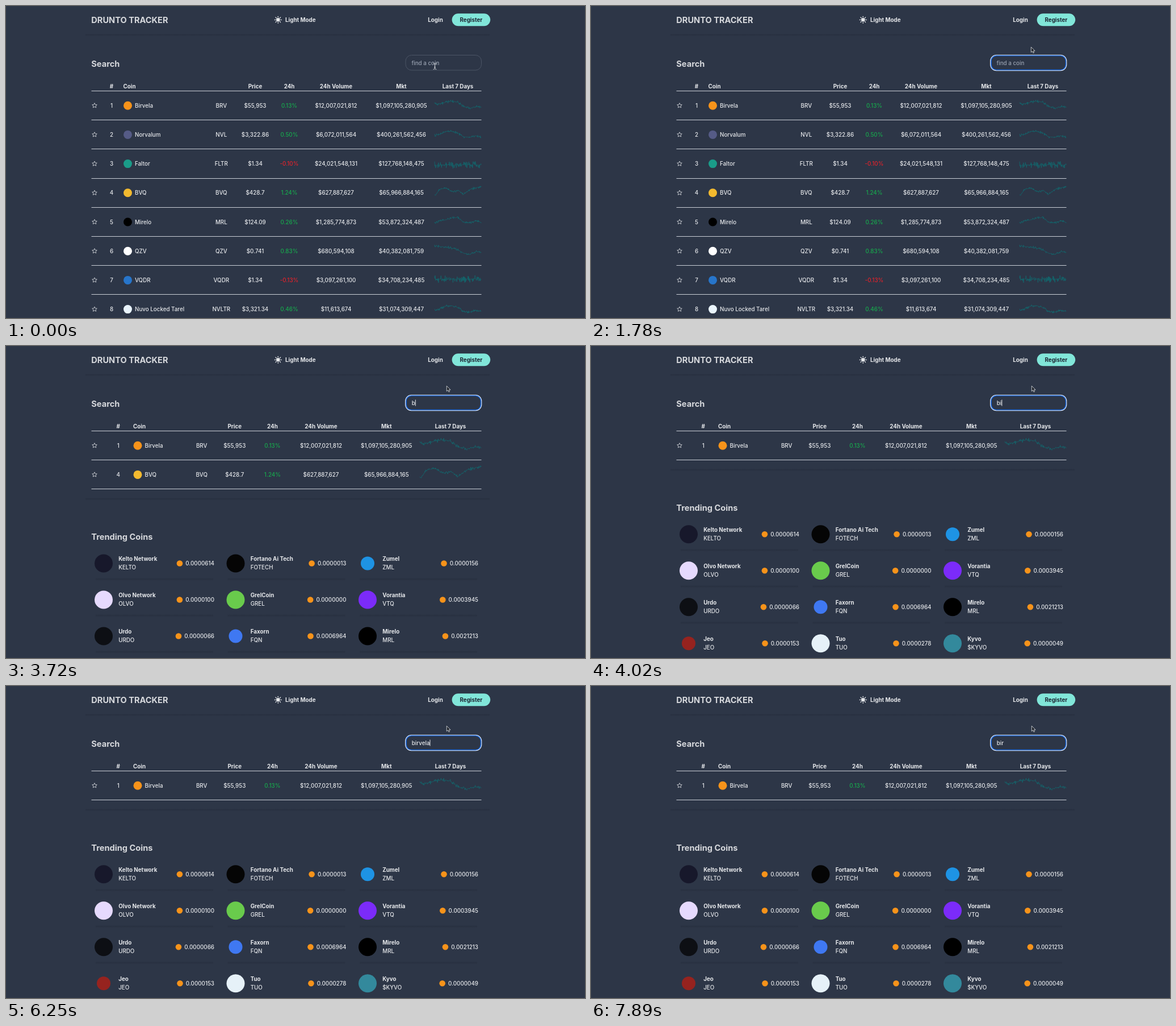
Animation of 1020x549 px, one loop 8 s. Source, as an HTML page:

```html
<!DOCTYPE html>
<html lang="en">
<head>
<meta charset="utf-8">
<title>Coin tracker</title>
<style>
html, body { margin: 0; width: 100%; height: 100%; overflow: hidden; background: #2d3647; }
svg { display: block; width: 1020px; height: 549px; font: 500 9.8px Inter, "Open Sans", sans-serif; fill: #e6e8eb; }
.b { font-weight: 700; }
.h { font-weight: 700; font-size: 14.6px; fill: #d6d8dc; }
.m { text-anchor: middle; }
.e { text-anchor: end; }
.up { fill: #17a94d; }
.down { fill: #e3222b; }
.line { stroke: #c9ced6; }
.spark { stroke: #14666c; fill: none; stroke-linejoin: round; }
.star { stroke: #e0e3e6; fill: none; stroke-width: .8; stroke-linejoin: round; }
</style>
</head>
<body>
<svg viewBox="0 0 1020 549">
  <defs>
    <linearGradient id="fade" x2="0" y2="1">
      <stop stop-color="#1c2230" stop-opacity="0"/>
      <stop offset=".4" stop-color="#1c2230" stop-opacity=".28"/>
      <stop offset="1" stop-color="#1c2230" stop-opacity="0"/>
    </linearGradient>
  </defs>
  <g id="page"></g>
  <rect id="box" x="704" y="86.5" width="133.5" height="26.5" rx="10.5" fill="none" stroke="#4b5465"/>
  <g id="ring" fill="none">
    <rect x="704.9" y="87.4" width="131.7" height="25.2" rx="9.5" stroke="#1763d8" stroke-width="1.8"/>
    <rect x="703.6" y="86.2" width="134.2" height="27.5" rx="10.7" stroke="#dfeafb" stroke-width="1.1"/>
  </g>
  <text id="hint" x="714.5" y="103.6" fill="#98a1b0">find a coin</text>
  <text id="typed" x="714.8" y="103.6"></text>
  <rect id="caret" y="94.5" width="1" height="11"/>
  <path id="arrow" d="M0 0V9.4L2.2 7.5 3.7 10.7 5.2 10 3.8 6.9H6.8Z" fill="#20242c" stroke="#e4e6e9" stroke-width=".8"/>
  <path id="beam" d="M-2.8-5.2Q0-5.2 0-3.2Q0-5.2 2.8-5.2M0-3.2V3.4M-2.8 5.4Q0 5.4 0 3.4Q0 5.4 2.8 5.4M-1.5 1.8H1.5" fill="none" stroke="#d5d8dc"/>
</svg>
<script>
const $ = id => document.getElementById(id);
const ORANGE = '#f7931a';

const text = (x, y, s, cls = '') => `<text x="${x}" y="${y + 3.6}" class="${cls}">${s}</text>`;
const title = (y, s) => `<text x="150.3" y="${y + 5.4}" class="h">${s}</text>`;
const dot = (x, y, r, fill) => `<circle cx="${x}" cy="${y}" r="${r}" fill="${fill}"/>`;
const shade = (x, y, w) => `<rect x="${x}" y="${y - 2}" width="${w}" height="5" fill="url(#fade)"/>`;
const rule = i => `<path class="line" d="M150.5 ${Math.round(149 + 51.2 * i) + .5}H837.5"/>`;

// Evenly spaced sparkline heights around the row centre
const wave = [1, -1, -6, -6, -3, 4, 5, 2, 4];
const coins = [
  ['Birvela', 'BRV', '$55,953', '0.13%', '$12,007,021,812', '$1,097,105,280,905', ORANGE, [-3, -3, -6, -8, -6, 2, 5, 2, 2]],
  ['Norvalum', 'NVL', '$3,322.86', '0.50%', '$6,072,011,564', '$400,261,562,456', '#555b86', wave],
  ['Faltor', 'FLTR', '$1.34', '-0.10%', '$24,021,548,131', '$127,768,148,475', '#1a9c89', [2, 2]],
  ['BVQ', 'BVQ', '$428.7', '1.24%', '$627,887,627', '$65,966,884,165', '#f3ba2f', [5, -7, -8, -2, -4, 2, -6, -9, -11]],
  ['Mirelo', 'MRL', '$124.09', '0.26%', '$1,285,774,873', '$53,872,324,487', '#000', [2, -2, -4, -7, -8, 1, 2, -2, 1]],
  ['QZV', 'QZV', '$0.741', '0.83%', '$680,594,108', '$40,382,081,759', '#fff', [-9, -8, -7, -5, -2, 4, 6, 1, 3]],
  ['VQDR', 'VQDR', '$1.34', '-0.13%', '$3,097,261,100', '$34,708,234,485', '#2775ca', [-2, -2]],
  ['Nuvo Locked Tarel', 'NVLTR', '$3,321.34', '0.46%', '$11,613,674', '$31,074,309,447', '#e9f4fc', wave],
];
const trends = [
  ['Kelto Network', 'KELTO', '0.0000614', '#17182b'],
  ['Fortano Ai Tech', 'FOTECH', '0.0000013', '#050505'],
  ['Zumel', 'ZML', '0.0000156', '#1e93e4', 12],
  ['Olvo Network', 'OLVO', '0.0000100', '#e6dafe'],
  ['GrelCoin', 'GREL', '0.0000000', '#69cb4c'],
  ['Vorantia', 'VTQ', '0.0003945', '#7b2bf9'],
  ['Urdo', 'URDO', '0.0000066', '#0d0f14'],
  ['Faxorn', 'FQN', '0.0006964', '#3f78f2', 12],
  ['Mirelo', 'MRL', '0.0021213', '#000'],
  ['Jeo', 'JEO', '0.0000153', '#96231f', 12],
  ['Tuo', 'TUO', '0.0000278', '#e6f1f8'],
  ['Kyvo', '$KYVO', '0.0000049', '#33899c'],
];

const pen = document.createElement('canvas').getContext('2d');
pen.font = '500 9.8px Inter, "Open Sans", sans-serif';
const width = s => pen.measureText(s).width;

// Hourly points for a week: straight runs between the heights plus seeded noise
function spark(heights, seed) {
  const last = heights.length - 1, noise = last > 1 ? 2.4 : 6.5;
  const points = [];
  for (let i = 0; i < 168; i++) {
    const u = i / 168 * last, j = Math.floor(u);
    seed = seed * 16807 % 2147483647;
    const r = seed / 2147483647 * 2 - 1;
    const y = heights[j] + (heights[j + 1] - heights[j]) * (u - j) + noise * r ** 3;
    points.push((i * 82 / 167).toFixed(2) + ' ' + y.toFixed(2));
  }
  return 'M' + points.join('L');
}

function star(x, y) {
  const points = [];
  for (let i = 0; i < 10; i++) {
    const a = i * Math.PI / 5, r = i % 2 ? 2.1 : 4.5;
    points.push((x + r * Math.sin(a)).toFixed(2) + ' ' + (y - r * Math.cos(a)).toFixed(2));
  }
  return `<path class="star" d="M${points.join('L')}Z"/>`;
}

function table([num, coin, sym, price, day, vol, mkt, left], ids) {
  const k = (837 - left) / 82;
  const heads = [[num, '#'], [price, 'Price'], [day, '24h'], [vol, '24h Volume'], [mkt, 'Mkt'], [left + 41 * k, 'Last 7 Days']];
  let s = heads.map(([x, t]) => text(x, 141, t, 'b m')).join('') + text(coin, 141, 'Coin', 'b') + rule(0);
  ids.forEach((id, i) => {
    const [name, code, cost, change, volume, market, fill, heights] = coins[id];
    const y = 175.2 + 51.2 * i;
    s += star(156, y) + dot(coin + 8, y, 7.5, fill) + text(coin + 20.5, y, name)
      + [[num, id + 1], [sym, code], [price, cost], [vol, volume], [mkt, market]].map(([x, t]) => text(x, y, t, 'm')).join('')
      + text(day, y, change, 'm ' + (change[0] === '-' ? 'down' : 'up')) + rule(i + 1)
      + `<path class="spark" transform="translate(${left} ${y}) scale(${k})" stroke-width="${.9 / k}" d="${spark(heights, 77 + id * 991)}"/>`;
  });
  return s;
}

// The trending list follows a table of the given number of rows
function trending(rows) {
  const top = 166.4 + 51.2 * rows;
  let s = shade(140, top, 712) + title(top + 66.7, 'Trending Coins');
  trends.forEach(([name, code, price, fill, r = 16], i) => {
    const x = 172 + 232.5 * (i % 3), y = top + 113.7 + 64 * Math.floor(i / 3), right = x + 195;
    s += dot(x, y, r, fill) + text(x + 26.2, y - 8, name, 'b') + text(x + 26.2, y + 7.3, code)
      + text(right, y, price, 'e') + dot(right - width(price) - 10.3, y, 5.3, ORANGE)
      + shade(x - 14, y + 27.5, 207);
  });
  return s;
}

let rays = '';
for (let a = 0; a < 360; a += 45) {
  rays += `<path d="M0-4.6V-6" transform="rotate(${a})" stroke="#e6e8eb" stroke-width="1.3" stroke-linecap="round"/>`;
}
const wide = [186, 206.5, 379.3, 439, 499, 581.5, 696.5, 755];
const found = [197.7, 224, 344.7, 402.8, 469.4, 555, 670.3, 729];

$('page').innerHTML = title(24.6, 'DRUNTO TRACKER')
  + `<g transform="translate(479.3 24.3)">${dot(0, 0, 3.3, '#e6e8eb')}${rays}</g>`
  + text(492, 24.5, 'Light Mode', 'b') + text(743.3, 24.5, 'Login', 'b')
  + '<rect x="785.6" y="13.2" width="67.6" height="22" rx="11" fill="#81e6d9"/>'
  + '<g fill="#1d2533">' + text(819.4, 24.5, 'Register', 'b m') + '</g>'
  + shade(140, 50.5, 712) + title(102, 'Search')
  + [table(wide, [...coins.keys()]), table(found, [0, 3]) + trending(2), table(found, [0]) + trending(1)]
    .map(s => `<g class="view">${s}</g>`).join('');
const views = document.querySelectorAll('.view');

const FOCUS = 1040;
const typing = [3720, 4020, 4170, 4610, 4910, 5050, 5350];
const erasing = [7140, 7240, 7340, 7440];
const resets = [FOCUS, ...typing, ...erasing];
const past = (list, t) => list.filter(k => k <= t);
const show = (el, on) => el.style.display = on ? '' : 'none';

// Progress from 0 to 1 in n jumps, as the pointer was sampled
const steps = (t, start, n) => Math.min(1, Math.max(0, Math.floor((t - start) / 145) + 1) / n);

function draw(now) {
  const t = now % 8000;
  const n = past(typing, t).length - past(erasing, t).length;
  const word = 'birvela'.slice(0, n);
  views.forEach((v, i) => show(v, i === Math.min(n, 2)));
  show($('box'), t < FOCUS);
  show($('ring'), t >= FOCUS);
  show($('hint'), !n);
  $('typed').textContent = word;

  const reset = past(resets, t).pop();
  $('caret').setAttribute('x', 714.8 + width(word));
  show($('caret'), t >= FOCUS && Math.floor((t - reset) / 450) % 2 === 0);

  const drift = steps(t, 140, 4), leave = 1 - (1 - steps(t, 1490, 5)) ** 3;
  const x = 755.5 + 5 * drift + 15.8 * leave, y = 106 - 6.2 * drift - 29.6 * leave;
  const inside = y > 85;
  show($('beam'), inside);
  show($('arrow'), !inside);
  $(inside ? 'beam' : 'arrow').setAttribute('transform', `translate(${x} ${y})`);
  requestAnimationFrame(draw);
}
draw(performance.now());
</script>
</body>
</html>
```
